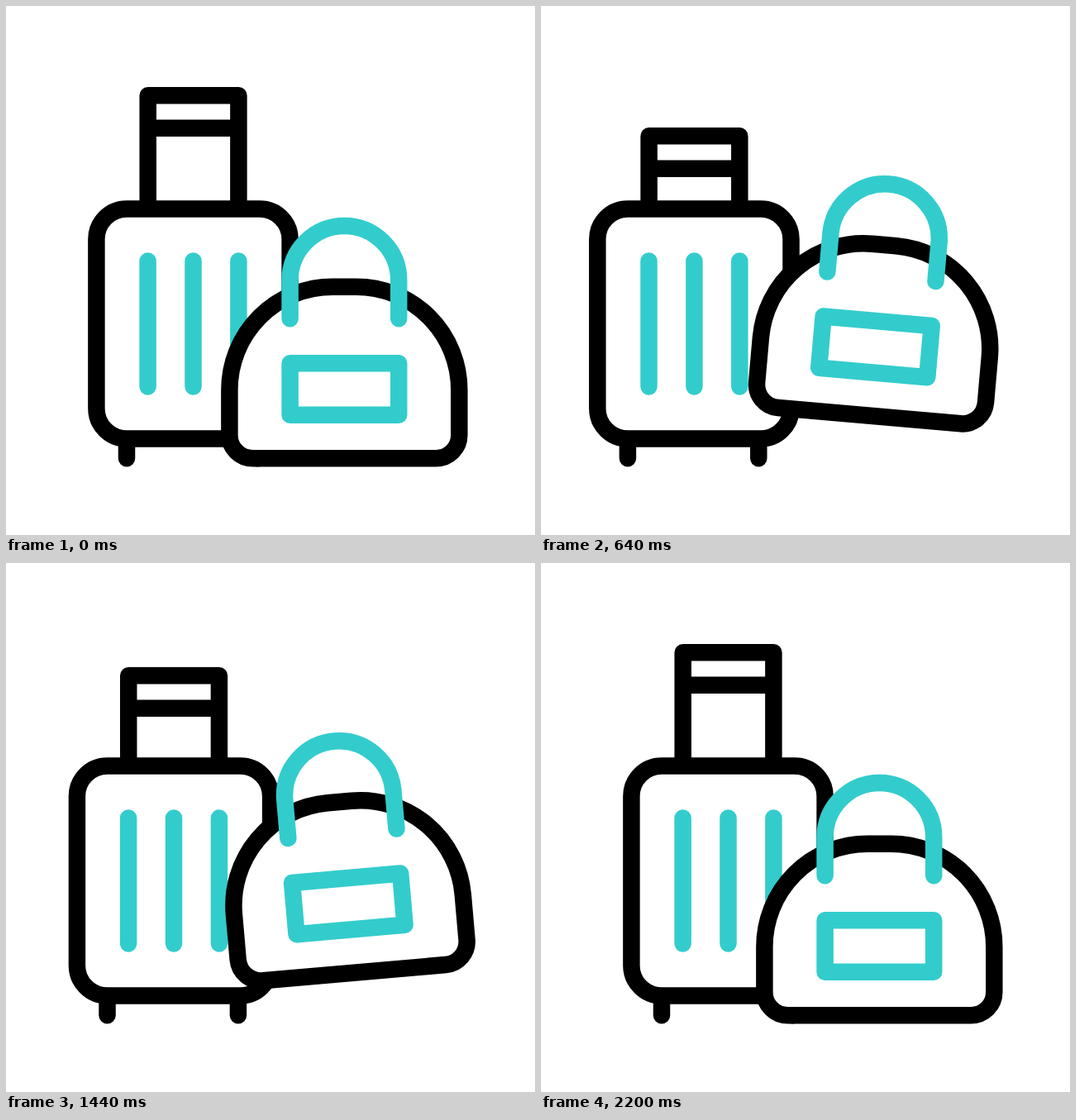
Write an HTML page that moves like this. It is 640 px wide and 640 px high and loops after 2.42 s.

```html
<!DOCTYPE html>
<html lang="en">
<head>
<meta charset="utf-8">
<title>Luggage</title>
<style>
  html, body { margin: 0; width: 100%; height: 100%; overflow: hidden; background: #fff; }
  svg { display: block; width: 100%; height: 100%; }
  g { fill: none; stroke: #000; stroke-width: 20.5; stroke-linecap: round; stroke-linejoin: round; }
  .body { fill: #fff; }
  .accent { stroke: #33cccc; }
</style>
</head>
<body>
<svg viewBox="0 0 640 640">
  <g id="suitcase">
    <path id="handle"/>
    <path d="M146 524V547.3M304.4 524V547.3"/>
    <rect class="body" x="109.4" y="245.5" width="234.2" height="278" rx="36.6"/>
    <path class="accent" d="M171.6 308.4V460.4M226.5 308.4V460.4M281.4 308.4V460.4"/>
  </g>
  <g id="bag">
    <path class="body" d="M270.4 464.3A124.5 124.5 0 0 1 394.9 339.8H423.8A124.5 124.5 0 0 1 548.3 464.3V519.2A28 28 0 0 1 520.3 547.2H298.4A28 28 0 0 1 270.4 519.2Z"/>
    <path class="accent" d="M343.6 378.2V331.8A65.8 65.8 0 0 1 475.2 331.8V378.2M343.6 432.3H475.2V494.8H343.6Z"/>
  </g>
</svg>
<script>
const LOOP = 2420, LEAD = 200, STEP = 20, STEPS = 100;
const [suitcase, handle, bag] = ['suitcase', 'handle', 'bag'].map(id => document.getElementById(id));

// Smooth 0..1 ramp between two steps
function ease(n, from, to) {
  const u = Math.min(1, Math.max(0, (n - from) / (to - from)));
  return u * u * (3 - 2 * u);
}

function draw(n) {
  const slide = ease(n, 0, 25) - ease(n, 25.4, 48.9) + ease(n, 48.9, 73.5) - ease(n, 74.8, 100);
  const lift = ease(n, 0, 19.6) - ease(n, 74, 100);
  const tilt = 5 * lift * (1 - 2 * ease(n, 37.5, 62.5));
  const top = 108.2 + 51 * slide;

  suitcase.setAttribute('transform', `translate(${-42.8 * slide} 0)`);
  handle.setAttribute('d', `M171.7 245.5V${top}H281.4V245.5M171.7 ${top + 39.6}H281.4`);
  bag.setAttribute('transform', `translate(0 ${-51 * lift}) rotate(${tilt} 409.4 407)`);
}

const start = performance.now();
function tick() {
  const t = (performance.now() - start) % LOOP;
  draw(Math.min(STEPS, Math.max(0, Math.floor((t - LEAD) / STEP))));
  requestAnimationFrame(tick);
}
tick();
</script>
</body>
</html>
```
